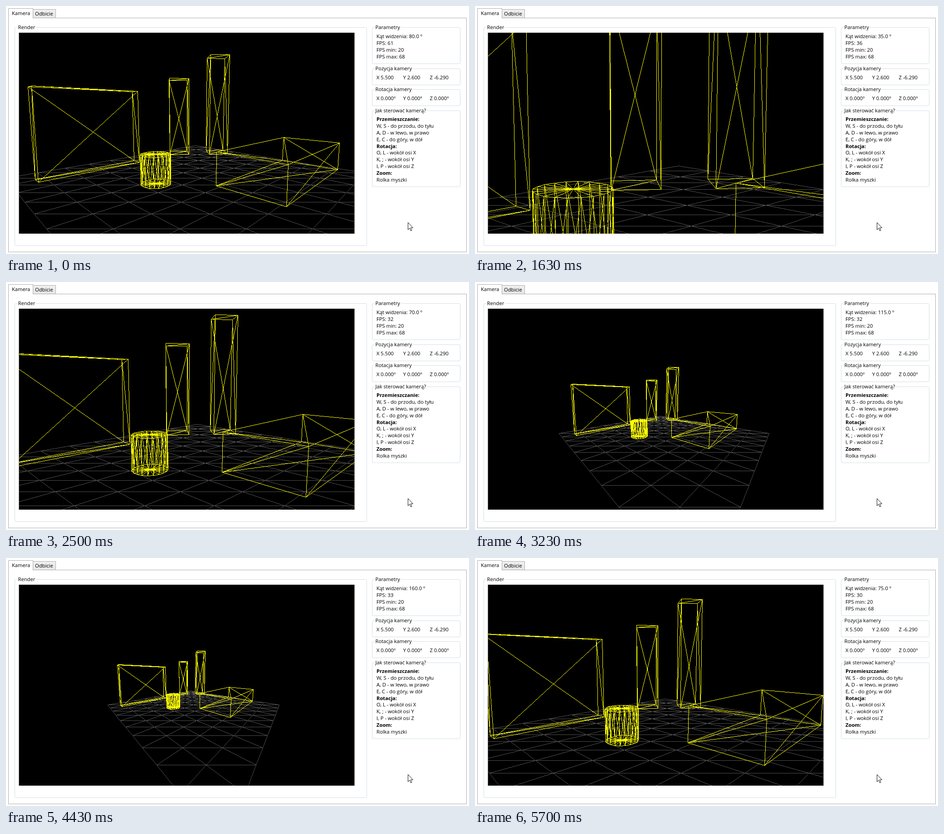
Recreate the animation shown at these times as an HTML page with a canvas. Size 1021 by 548 pixels, loop 6.06 s.

```html
<!DOCTYPE html>
<html lang="pl">
<head>
<meta charset="utf-8">
<title>Kamera</title>
<style>
html, body { margin: 0; width: 100%; height: 100%; overflow: hidden; background: #fff; }
canvas { position: absolute; left: 29px; top: 59px; }
svg { position: absolute; left: 0; top: 0; }
text { font: 11.2px "Open Sans", "Noto Sans", sans-serif; fill: #000; white-space: pre; }
.b { font-weight: 700; }
.tab { fill: #fff; stroke: #acacac; }
.group { fill: none; stroke: #d5dfe5; }
</style>
</head>
<body>
<svg id="ui" width="1021" height="548" viewBox="0 0 1021 548">
  <defs>
    <linearGradient id="grey" x2="0" y2="1">
      <stop stop-color="#f0f0f0"/><stop offset="1" stop-color="#e5e5e5"/>
    </linearGradient>
  </defs>
  <rect class="tab" x="5.5" y="26.5" width="1010" height="517"/>
  <rect class="tab" x="59.5" y="7.5" width="50" height="19" style="fill:url(#grey)"/>
  <path class="tab" d="M5.5 27V5.5H59.5V27"/>
  <path d="M6 26.5H59" stroke="#fff"/>
  <rect x="28.5" y="59" width="740" height="444"/>
  <path d="M886.5 478.5V494.5L890 491L892.6 496.8L895 495.8L892.4 490H897.5Z" fill="#fff" stroke="#111"/>
</svg>
<canvas id="view" width="739" height="444"></canvas>
<script>
const LOOP = 6060, W = 739, H = 444, MID_X = 369, MID_Y = 222;
const ui = document.getElementById("ui");
const ctx = document.getElementById("view").getContext("2d");
const image = ctx.createImageData(W, H);
const pixels = new Uint32Array(image.data.buffer);
const BLACK = 0xff000000, GREY = 0xff505050, YELLOW = 0xff00ffff;

// ---- window ----
function add(name, attrs, text = "") {
  const el = document.createElementNS("http://www.w3.org/2000/svg", name);
  for (const k in attrs) el.setAttribute(k, attrs[k]);
  el.textContent = text;
  ui.append(el);
  return el;
}
const label = (x, y, text, cls = "") => add("text", { x, y, class: cls }, text);

function group(x, y, w, h, title) {
  add("rect", { class: "group", x: x + .5, y: y + .5, width: w, height: h, rx: 2.5 });
  const head = label(x + 7.5, y + 4, title);
  const gap = add("rect", { x: x + 5, y: y - 4, width: head.getComputedTextLength() + 5, height: 9, fill: "#fff" });
  ui.insertBefore(gap, head);
}

label(13, 20, "Kamera");
label(64, 20.5, "Odbicie");
group(19, 47, 776, 482, "Render");
group(807, 47, 194, 80, "Parametry");
group(807, 138, 194, 36, "Pozycja kamery");
group(807, 184, 194, 36, "Rotacja kamery");
group(807, 231, 194, 168, "Jak sterować kamerą?");
const fovText = label(817, 71, "");
const fpsText = label(817, 86, "");
label(817, 101, "FPS min: 20");
label(817, 115.5, "FPS max: 68");

const camera = { X: 5.5, Y: 2.6, Z: -6.29 };
Object.entries(camera).forEach(([axis, value], i) => {
  const x = 817 + i * 58.7;
  label(x, 161.5, `${axis} ${value.toFixed(3)}`);
  label(x, 207.5, `${axis} 0.000º`);
});
["Przemieszczanie:", "W, S - do przodu, do tyłu", "A, D - w lewo, w prawo", "E, C - do góry, w dół",
 "Rotacja:", "O, L - wokół osi X", "K, ; - wokół osi Y", "I, P - wokół osi Z", "Zoom:", "Rolka myszki"
].forEach((s, i) => label(817, 254.3 + i * 14.8, s, s.endsWith(":") ? "b" : ""));

// ---- scene ----
const lines = [];
const seg = (a, b, color = YELLOW) => lines.push([a, b, color]);
const rad = deg => deg * Math.PI / 180;

// The camera is turned 45 degrees and tilted slightly down; returns x/z and y/z.
const TILT = rad(6.62);
function project(x, y, z) {
  const dx = x - camera.X, dz = z - camera.Z, drop = camera.Y - y;
  const ahead = (dz - dx) * Math.SQRT1_2;
  const depth = ahead * Math.cos(TILT) + drop * Math.sin(TILT);
  return [(dz + dx) * Math.SQRT1_2 / depth, (drop * Math.cos(TILT) - ahead * Math.sin(TILT)) / depth];
}

function floor(half) {
  for (let x = -half; x <= half; x++)
    for (let z = -half; z <= half; z++) {
      const p = project(x, 0, z);
      if (x < half) seg(p, project(x + 1, 0, z), GREY);
      if (z < half) seg(p, project(x, 0, z + 1), GREY);
      if (x < half && z < half) seg(p, project(x + 1, 0, z + 1), GREY);
    }
}

// Every face is split into two triangles.
function box(x, z, width, depth, height, turn = 0) {
  const c = Math.cos(rad(turn)), s = Math.sin(rad(turn));
  const corner = (i, y) => {
    const u = (i === 1 || i === 2 ? .5 : -.5) * width, v = (i > 1 ? .5 : -.5) * depth;
    return project(x + u * c - v * s, y, z + u * s + v * c);
  };
  for (let i = 0; i < 4; i++) {
    const j = (i + 1) % 4;
    seg(corner(i, 0), corner(j, 0));
    seg(corner(i, height), corner(j, height));
    seg(corner(i, 0), corner(i, height));
    seg(corner(i, 0), corner(j, height));
  }
  seg(corner(3, height), corner(1, height));
  seg(corner(0, 0), corner(2, 0));
}

function cylinder(x, z, r, height, sides) {
  const rim = (i, y) => {
    const a = rad(45) + i * 2 * Math.PI / sides;
    return project(x + r * Math.cos(a), y, z + r * Math.sin(a));
  };
  for (let i = 0; i < sides; i++) {
    for (const y of [0, height]) {
      seg(rim(i, y), rim(i + 1, y));
      seg(rim(i, y), project(x, y, z));
    }
    seg(rim(i, height), rim(i, 0));
    seg(rim(i, height), rim(i - 1, 0));
  }
}

floor(5);
box(-3.89, -2.24, .445, 4.08, 3.24);
box(-4.03, 2.63, 1, 1, 4, 50);
box(-2.66, 4.25, 1, 1, 5.23, 50);
box(2, 2.25, 2.28, 5.07, 1.12);
cylinder(-.71, -1.53, .5, 1, 20);

function drawLine(x0, y0, x1, y1, color) {
  const dx = Math.abs(x1 - x0), dy = Math.abs(y1 - y0);
  const sx = Math.sign(x1 - x0), sy = Math.sign(y1 - y0);
  let err = dx - dy;
  for (;;) {
    if (x0 >= 0 && x0 < W && y0 >= 0 && y0 < H) pixels[y0 * W + x0] = color;
    if (x0 === x1 && y0 === y1) return;
    const e = 2 * err;
    if (e > -dy) { err -= dy; x0 += sx; }
    if (e < dx) { err += dx; y0 += sy; }
  }
}

function render(fov) {
  const focal = 441.5 / Math.tan(rad(fov / 2));
  const sx = p => Math.round(MID_X + p[0] * focal), sy = p => Math.round(MID_Y + p[1] * focal);
  pixels.fill(BLACK);
  for (const [a, b, color] of lines) drawLine(sx(a), sy(a), sx(b), sy(b), color);
  ctx.putImageData(image, 0, 0);
}

// ---- timeline ----
// Wheel bursts: start, ms per notch of 5 degrees, angle reached.
const bursts = [
  [200, 50, 105], [500, 50, 70], [830, 70, 55], [1070, 50, 25], [1470, 30, 35],
  [1730, 74, 65], [2470, 100, 80], [2830, 20, 110], [3230, 35, 130], [3670, 32, 160],
  [4000, 26, 130], [4430, 70, 115], [4830, 46, 95], [5230, 90, 75]
];
const zoom = [{ t: 0, fov: 80 }];
let fov = 80;
for (const [start, gap, end] of bursts)
  for (let t = start; fov !== end; t += gap) {
    fov += 5 * Math.sign(end - fov);
    zoom.push({ t, fov });
  }
const fovAt = t => zoom.findLast(step => step.t <= t).fov;

// The readout lags behind: it is refreshed only now and then.
const refreshes = [0, 280, 800, 1000, 1320, 1630, 2270, 2500, 3230, 3830, 4500, 4670, 5410, 5700];
function fpsAt(t) {
  const s = t / 1000;
  const bump = s > 2.4 && s < 5.7 ? 2.7 * Math.sin(Math.PI * (s - 2.4) / 3.3) : 0;
  return Math.round(30 + 31 * Math.exp(-.8 * s ** 1.5) + bump);
}

let shownFov, shownRefresh;
function tick() {
  const t = performance.now() % LOOP;
  const now = fovAt(t), refresh = refreshes.findLast(r => r <= t);
  if (now !== shownFov) render(shownFov = now);
  if (refresh !== shownRefresh) {
    shownRefresh = refresh;
    fovText.textContent = `Kąt widzenia: ${fovAt(refresh).toFixed(1)} º`;
    fpsText.textContent = `FPS: ${fpsAt(refresh)}`;
  }
  requestAnimationFrame(tick);
}
tick();
</script>
</body>
</html>
```
